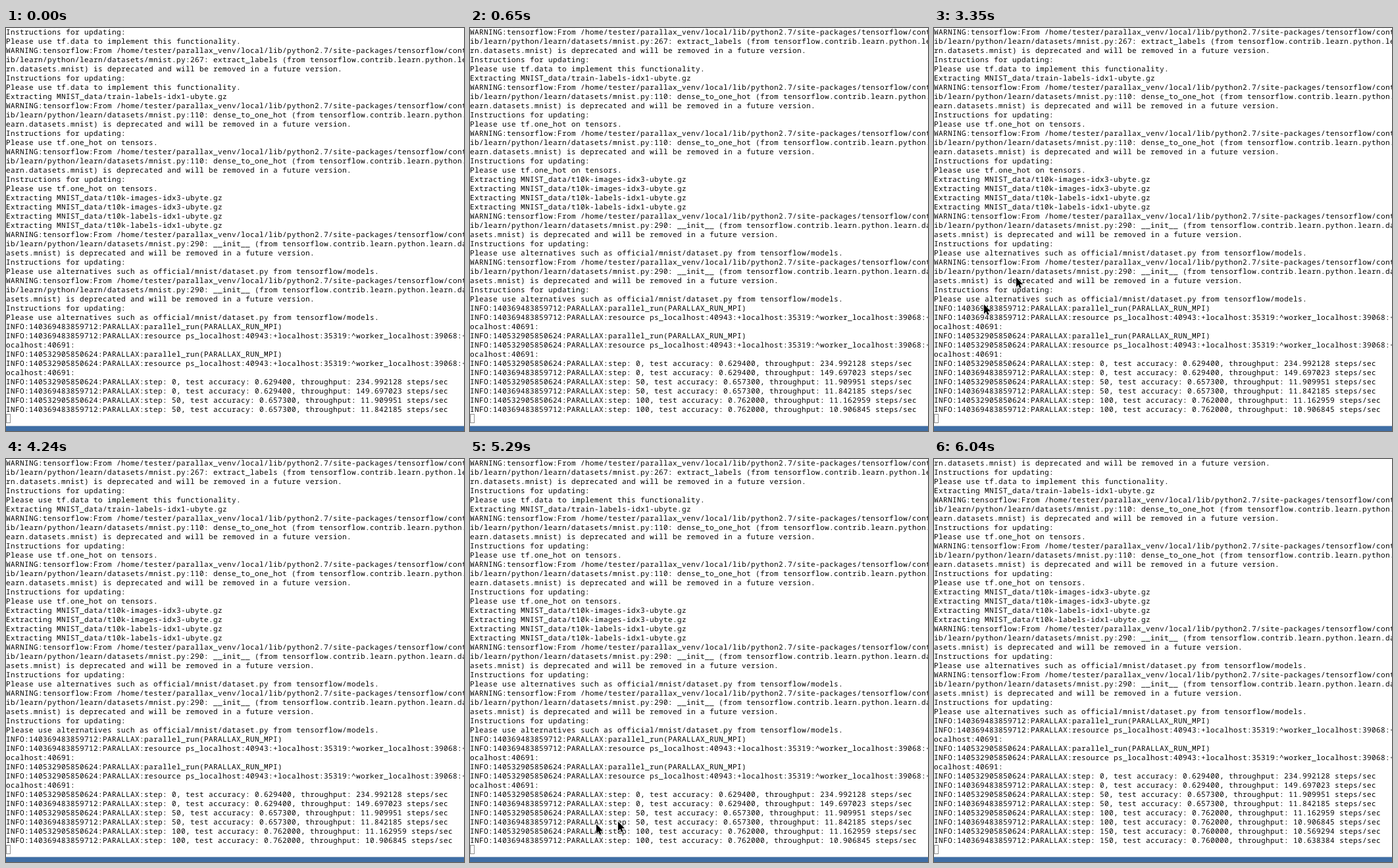
These frames come from a looping animation (696x613 px, 7000 ms). An HTML page:

```html
<!DOCTYPE html>
<html lang="en">
<head>
<meta charset="utf-8">
<title>Training log</title>
<style>
  html, body { margin: 0; width: 100%; height: 100%; overflow: hidden; background: #fff; }
  svg { display: block; }
  text {
    font: 500 11px "Noto Sans Mono", "DejaVu Sans Mono", monospace;
    font-variant-ligatures: none;
    text-rendering: geometricPrecision;
    fill: #000;
  }
  #log, .pointer { animation: scroll 7s step-end infinite; }
  .pointer { animation-name: lead; filter: drop-shadow(0 1px 1px rgba(0, 0, 0, .3)); }
  .trail { animation-name: trail; }

  @keyframes scroll {
    0% { transform: translateY(0); }
    7.142% { transform: translateY(-14px); }
    9.285% { transform: translateY(-28px); }
    86.285%, 100% { transform: translateY(-56px); }
  }
  @keyframes lead {
    0%, 60.571%, 86.285%, 100% { transform: translate(-50px, -50px); }
    47.857% { transform: translate(123px, 379px); }
    50% { transform: translate(124px, 379px); }
    52.142% { transform: translate(100px, 399px); }
    54.142% { transform: translate(4px, 517px); }
    75.571% { transform: translate(190px, 555px); }
    77.714% { transform: translate(227px, 551px); }
    79.857% { transform: translate(366px, 564px); }
    82% { transform: translate(527px, 601px); }
    84.142% { transform: translate(528px, 601px); }
  }
  @keyframes trail {
    0%, 50%, 54.142%, 77.714%, 82%, 86.285%, 100% { transform: translate(-50px, -50px); }
    47.857% { transform: translate(74px, 420px); }
    52.142% { transform: translate(51px, 463px); }
    75.571% { transform: translate(223px, 551px); }
    79.857% { transform: translate(469px, 587px); }
    84.142% { transform: translate(546px, 601px); }
  }
</style>
</head>
<body>
<svg width="696" height="613" viewBox="0 0 696 613">
  <defs>
    <path id="arrow" d="M2 .5V14.7L5.2 11.6L7.3 16.5L9.6 15.5L7.5 10.7H12Z"
      fill="#000" stroke="#fff" stroke-width="1.6" paint-order="stroke"/>
  </defs>
  <rect width="696" height="613" fill="#fff"/>
  <svg width="696" height="587" overflow="hidden"><g id="log"></g></svg>
  <rect x=".5" y="587.5" width="6" height="13" fill="none" stroke="#8c8c8c"/>
  <rect y="605" width="696" height="1" fill="#8fa6c1"/>
  <rect y="606" width="696" height="7" fill="#3f6ea5"/>
  <g class="pointer trail"><use href="#arrow"/></g>
  <g class="pointer"><use href="#arrow"/></g>
</svg>
<script>
  const COLS = 101, CELL = 7, ROW = 14, BASELINE = 10;
  const log = document.getElementById('log');
  const workers = ['140532905850624', '140369483859712'];

  const updating = 'Instructions for updating:';
  const useData = 'Please use tf.data to implement this functionality.';
  const extract = name => `Extracting MNIST_data/${name}-ubyte.gz`;
  const info = (id, msg) => `INFO:${id}:PARALLAX:${msg}`;
  const warn = (line, fn) =>
    'WARNING:tensorflow:From /home/tester/parallax_venv/local/lib/python2.7/site-packages/tensorflow/' +
    `contrib/learn/python/learn/datasets/mnist.py:${line}: ${fn} ` +
    '(from tensorflow.contrib.learn.python.learn.datasets.mnist) ' +
    'is deprecated and will be removed in a future version.';
  const twice = (...lines) => [...lines, ...lines];
  const start = id => [
    info(id, 'parallel_run(PARALLAX_RUN_MPI)'),
    info(id, 'resource ps_localhost:40943:+localhost:35319:^worker_localhost:39068:+localhost:40691:')
  ];
  const step = (n, accuracy, ...rates) => rates.map((rate, i) =>
    info(workers[i], `step: ${n}, test accuracy: ${accuracy}, throughput: ${rate} steps/sec`));

  const lines = [
    updating, useData,
    warn(267, 'extract_labels'), updating, useData,
    extract('train-labels-idx1'),
    ...twice(warn(110, 'dense_to_one_hot'), updating, 'Please use tf.one_hot on tensors.'),
    ...twice(extract('t10k-images-idx3')),
    ...twice(extract('t10k-labels-idx1')),
    ...twice(warn(290, '__init__'), updating,
      'Please use alternatives such as official/mnist/dataset.py from tensorflow/models.'),
    ...start(workers[1]),
    ...start(workers[0]),
    ...step(0, '0.629400', '234.992128', '149.697023'),
    ...step(50, '0.657300', '11.909951', '11.842185'),
    ...step(100, '0.762000', '11.162959', '10.906845'),
    ...step(150, '0.760000', '10.569294', '10.638384')
  ];

  // Hard-wrap at the terminal width
  const rows = lines.flatMap(line => line.match(new RegExp(`.{1,${COLS}}`, 'g')));
  rows.forEach((row, i) => {
    const text = document.createElementNS('http://www.w3.org/2000/svg', 'text');
    text.setAttribute('y', i * ROW + BASELINE);
    text.textContent = row;
    log.append(text);
  });

  // Snap the font's advance to the cell grid
  const first = log.firstChild;
  const advance = first.getComputedTextLength() / first.textContent.length;
  log.style.letterSpacing = `${CELL - advance}px`;
</script>
</body>
</html>
```
